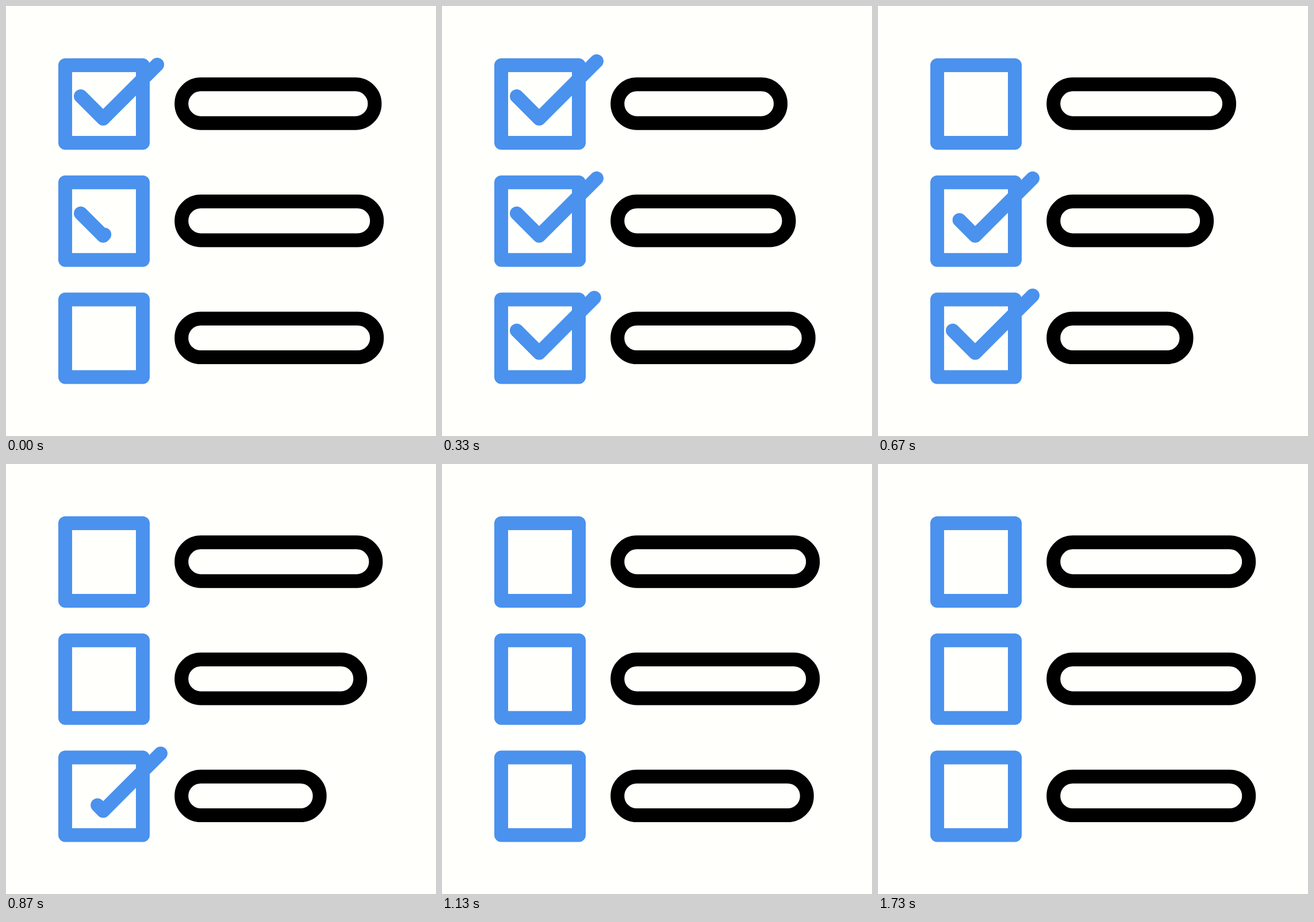
Animation, 748 px wide and 748 px high, one loop 1790 ms. Source, as an HTML page:

```html
<!DOCTYPE html>
<html>
<head>
<meta charset="utf-8">
<style>
  html, body { margin: 0; height: 100%; overflow: hidden; background: #fffffc; }
  svg { display: block; width: 100%; height: 100%; fill: none; stroke-width: 24; stroke-linejoin: round; stroke-linecap: round; }
</style>
</head>
<body>
<svg id="stage" viewBox="0 0 748 748"></svg>
<script>
const LOOP = 1790, STEP = 1000 / 15;   // ms
const DELAY = 2.4;                     // steps between rows
const BLUE = '#4a92ee';
const BAR = 340;

// Bar motion per row: how far it shrinks, when it is shortest, half duration
const rows = [
  { shrink: 59, peak: 6.33, half: 7.4 },
  { shrink: 77.5, peak: 8.65, half: 7 },
  { shrink: 112.5, peak: 11.1, half: 7.15 }
];

const stage = document.getElementById('stage');
const clamp = x => Math.min(1, Math.max(0, x));

function add(parent, tag, attrs) {
  const el = document.createElementNS('http://www.w3.org/2000/svg', tag);
  for (const key in attrs) el.setAttribute(key, attrs[key]);
  return parent.appendChild(el);
}

rows.forEach((row, i) => {
  const g = add(stage, 'g', { transform: `translate(0 ${i * 203.7})` });
  add(g, 'rect', { x: 103, y: 103, width: 135, height: 135, stroke: BLUE });
  row.check = add(g, 'path', { d: 'M130 157L169 196L269 96', pathLength: 1, stroke: BLUE });
  row.bar = add(g, 'rect', { x: 305.2, y: 136.3, width: BAR, height: 67.4, rx: 33.7, stroke: '#000' });
});

function draw(now) {
  const step = Math.floor((now % LOOP + 4) / STEP);
  rows.forEach((row, i) => {
    const t = step - i * DELAY;
    const end = 1 - clamp(0.455 - 0.192 * t) ** 4;       // ease out
    const start = clamp(0.28 + 0.262 * (t - 7)) ** 3;    // ease in
    row.check.style.display = end > start ? '' : 'none';
    row.check.setAttribute('stroke-dasharray', `${end - start} 9`);
    row.check.setAttribute('stroke-dashoffset', -start);

    const away = clamp(Math.abs(step - row.peak) / row.half);
    const pull = Math.cos(Math.PI / 2 * away ** 1.14) ** 2;
    row.bar.setAttribute('width', BAR - row.shrink * pull);
  });
}

const begin = performance.now();
function tick() {
  draw(performance.now() - begin);
  requestAnimationFrame(tick);
}
tick();
</script>
</body>
</html>
```
